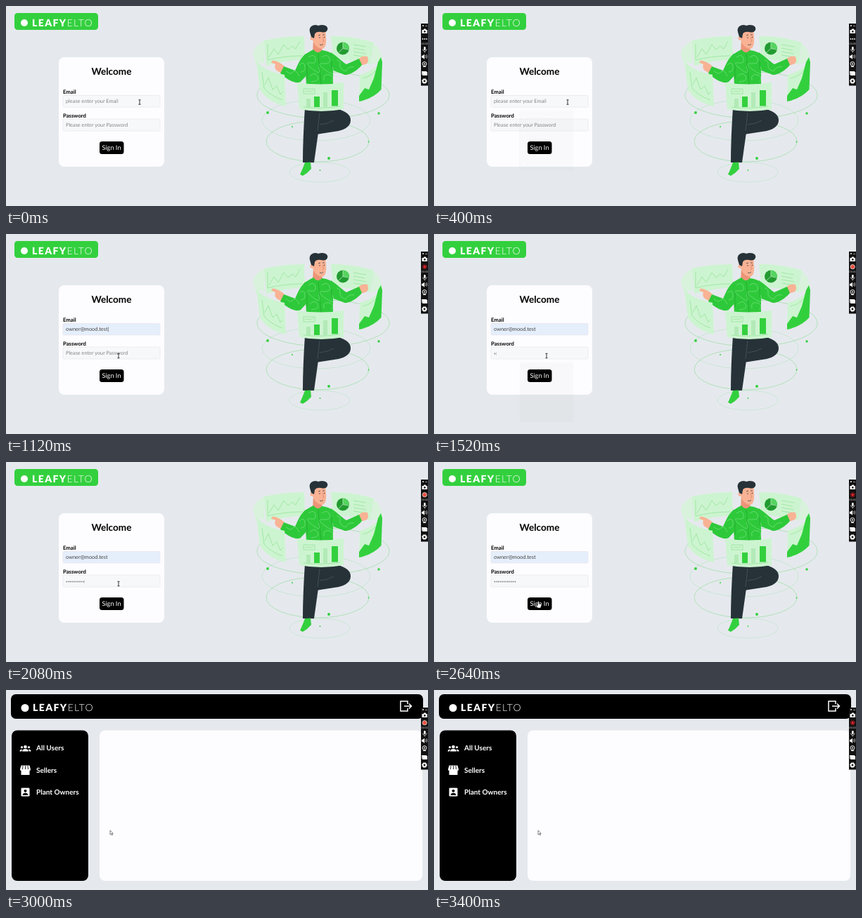
An HTML page for the animation above (3.44 s loop, 600 px wide and 285 px high).

```html
<!DOCTYPE html>
<html lang="en">
<head>
<meta charset="utf-8">
<title>Sign in demo</title>
<style>
html, body { margin: 0; width: 100%; height: 100%; overflow: hidden; background: #e5e9ed; }
svg { display: block; width: 600px; height: 285px; font-family: Lato, "Open Sans", sans-serif; text-rendering: geometricPrecision; }
.b { font-weight: 700; }
.logo { font-size: 14px; font-weight: 900; letter-spacing: 1.4px; fill: #fff; }
.logo .thin { font-weight: 300; letter-spacing: 1.2px; }
.line { fill: none; stroke: #45cf50; stroke-width: .5; stroke-opacity: .65; }
.panel { fill: #cdf4d0; }
.tiny { font-size: 5.3px; fill: #ddd; }
.ico { fill: none; stroke: #fff; stroke-width: 1.5; }
</style>
</head>
<body>
<svg viewBox="0 0 600 285">
<rect width="600" height="285" fill="#e5e9ed"/>

<g id="login">
  <rect x="12" y="10" width="119" height="24" rx="4.500" fill="#33d03e"/>
  <circle cx="26" cy="24" r="5" fill="#fff"/>
  <text class="logo" x="37" y="28.500">LEAFY<tspan class="thin">ELTO</tspan></text>

  <!-- rings and dots -->
  <g class="line">
    <ellipse cx="451" cy="127" rx="94" ry="33"/>
    <ellipse cx="441" cy="163" rx="77" ry="29" stroke-opacity=".35"/>
    <ellipse cx="443" cy="193" rx="73" ry="29"/>
    <ellipse cx="446" cy="237" rx="43" ry="14" stroke-opacity=".3"/>
  </g>
  <g fill="#33d03e">
    <circle cx="372" cy="152" r="1.900"/><circle cx="530" cy="153" r="1.700"/>
    <circle cx="407" cy="172" r="1"/><circle cx="515.500" cy="193.500" r=".9"/>
    <circle cx="459" cy="217" r="2"/><circle cx="446.500" cy="234" r=".9"/>
  </g>

  <!-- back panels -->
  <path d="M351 68Q354 55 368 49L367 82Q358 79 356 84ZM523 53Q533 60 535 77L519 84Z" fill="#d8f2dc"/>
  <path class="panel" d="M367 49Q395 43 424 43L425 76Q396 78 370 85ZM462 43Q494 43 523 52L518 83Q492 76 466 76Z"/>
  <path class="line" d="M372 54V77Q395 71 421 71M374 73l7-12 6 8 8-14 6 7 6-5 5 4 6-11M494 55l18 3M494 60l16 3M494 65l18 3M494 70l13 2"/>
  <circle cx="479" cy="60.500" r="9" fill="#229b30"/>
  <path d="M479 60.500V51.500A9 9 0 0 1 488 61.500Z" fill="#55d45f"/>
  <path d="M479 51V60.500L488 62.500M479 60.500L472 67" stroke="#cdf4d0" stroke-width=".7" fill="none"/>

  <!-- legs -->
  <g fill="#263238">
    <path d="M436 145H466C480 149 490 153 490 163C490 171 482 176 473 178L441 183Z"/>
    <path d="M425 145H448L444 180L438 223L422 223Q422 190 425 145Z"/>
  </g>
  <path d="M446 152L443 178M446 169Q458 168 466 163" fill="none" stroke="#55636a" stroke-width=".6"/>
  <path d="M425 223L433 222.500L434 232Q429 238 422 242L418 240Q421 234 425 223Z" fill="#33d03e"/>

  <!-- hands, neck, head -->
  <g fill="#f9b294">
    <path d="M396 86Q389 79 379 77.500L377 80.500L383 83Q381 88 385 92L392 96Z"/>
    <path d="M501 76Q506 70 514 72L515 77Q515 84 505 84Z"/>
    <path d="M437 49L436 66Q444 71 450 64L448 55Z" fill="#ec9478"/>
    <path d="M436 37L454 35Q458 60 449 61Q438 59 435 45Z"/>
    <circle cx="435" cy="46" r="2.600"/>
  </g>
  <path d="M432 37C430 30 437 25 444 28C452 25 459 29 457 34Q455 39 448 37Q441 36 439 40L438 46L434 44Z" fill="#263238"/>
  <path d="M444 42l3-1M450 41l3 0M446 55q3 2 5-1" fill="none" stroke="#263238" stroke-width=".7"/>
  <path d="M450 44l2 6-2 1" fill="none" stroke="#d4775f" stroke-width=".6"/>
  <circle cx="446" cy="45" r=".7" fill="#263238"/><circle cx="452.500" cy="44.500" r=".7" fill="#263238"/>

  <!-- shirt -->
  <g fill="#2ec93a">
    <path d="M426 68C417 76 415 84 411 92L395 86L390 96C399 105 413 112 419 108L430 96Z"/>
    <path d="M462 66C472 73 480 81 484 83L502 75L506 84C498 94 484 101 479 97L460 90Z"/>
    <path d="M425 69Q433 64 437 62Q444 70 449 63Q459 64 465 69L465 114H427Z"/>
  </g>
  <path d="M428 80V104M463 78V90M444 68L448 112" fill="none" stroke="#219c2e" stroke-width=".6"/>
  <path d="M398 92q6 7 10 2t9 6M417 84q7-6 8 2t-6 8M430 73q8-6 10 2t-8 6 4 9 8-4M432 100q7-7 11 0t-9 8M449 73q8-6 11 2t-9 7 4 10 9-5M452 106q-2-10 7-8t4 10M470 77q6 1 5 7t8 9q4-8 12-6" fill="none" stroke="#94ec9a" stroke-width=".5"/>

  <!-- front panels -->
  <path class="panel" d="M356 79Q368 93 396 98L398 143Q372 137 361 119ZM503 98Q526 92 534 76L533 119Q522 132 502 136Z"/>
  <path d="M364 94L367 117Q376 128 393 134M368 112l5-10 6 17 6-5 5 12 3-4M507 103Q519 100 526 92" class="line"/>
  <path d="M502 128L510 117L516 119L523 103L529 80L533 73L535 80L533.500 119Q522 132 502 136Z" fill="#33d03e"/>
  <path class="panel" d="M414 109Q447 114 480 109L480 147Q448 153 417 147Z"/>
  <path d="M423 118h16v7h-16zM425 122l4-1 4 1 4-2M423 144Q448 147 475 143" class="line"/>
  <path d="M427 132h6v12h-6zM451 123h6v21h-6z" fill="#b2eab7"/>
  <path d="M438 129h8v15h-8zM463 120h9v22.500h-9z" fill="#33d03e"/>

  <!-- form -->
  <rect x="75" y="73" width="150" height="156" rx="8" fill="#fdfcfe"/>
  <text class="b" x="150" y="98" font-size="13.600" text-anchor="middle">Welcome</text>
  <g class="b" font-size="7.700"><text x="81" y="125">Email</text><text x="81" y="158.500">Password</text></g>
  <g fill="#f7f8fa" stroke="#e5e7eb" stroke-width=".7">
    <rect id="mailBox" x="81" y="127.500" width="138" height="16.500" rx="1.500"/>
    <rect x="81" y="161" width="138" height="17" rx="1.500"/>
  </g>
  <text id="mail" x="85" y="138.200"></text>
  <text id="pass" x="85" y="171.700"></text>
  <rect x="133" y="193" width="34.500" height="18" rx="3.500"/>
  <text x="150" y="205.200" font-size="9.200" fill="#fff" text-anchor="middle">Sign In</text>

  <g id="menu">
    <rect x="121" y="149" width="77" height="85.500" rx="1" fill="#333"/>
    <g class="tiny">
      <text x="135" y="159">owner@mood...</text><text x="135" y="181">11@mood.test</text>
      <text x="136" y="228">Manage passwords...</text>
      <path d="M121 216H198" stroke="#888" stroke-width=".5"/>
      <circle cx="128" cy="160" r="2"/><circle cx="128" cy="182" r="2"/><circle cx="128" cy="204" r="2"/><circle cx="128" cy="226" r="2"/>
      <path d="M187 226h6m-2 0v2" stroke="#ddd"/>
    </g>
  </g>
  <g id="hints">
    <rect x="120" y="147" width="61" height="45.500" rx="2" fill="#202124" fill-opacity=".95"/>
    <g class="tiny"><text x="124" y="158">owner@mood.test</text><text x="124" y="172">ow@is.test</text><text x="124" y="186">owvelo@mood.test</text></g>
  </g>
  <rect id="menu2" x="122" y="183" width="76" height="85" rx="1" fill="#333"/>
</g>

<g id="dash">
  <rect x="7" y="6" width="586" height="35" rx="7"/>
  <circle cx="27" cy="25.500" r="5.500" fill="#fff"/>
  <text class="logo" x="38" y="30">LEAFY<tspan class="thin">ELTO</tspan></text>
  <rect x="8" y="57.500" width="109" height="214.500" rx="8"/>
  <rect x="133" y="57.500" width="459" height="214.500" rx="8" fill="#fdfcfe"/>
  <g class="b" font-size="10" fill="#fff"><text x="43" y="86.200">All Users</text><text x="43" y="117.700">Sellers</text><text x="43" y="149">Plant Owners</text></g>
  <g id="icons" fill="#fff">
    <path class="ico" d="M571 20V16H561V30H571V26M566 23H576M573 19.500L576.500 23L573 26.500"/>
    <circle cx="27.500" cy="81" r="2.300"/><circle cx="22.500" cy="81.500" r="1.600"/><circle cx="32.500" cy="81.500" r="1.600"/>
    <path d="M23 87.500Q23 84 27.500 84T32 87.500ZM19.500 87.500Q19.500 84.500 23 84.500L22 87.500ZM35.500 87.500Q35.500 84.500 32 84.500L33 87.500Z"/>
    <path d="M21.500 107.500H33.500L35 113Q35 115 33.500 115V121H21.500V115Q20 115 20 113Z"/>
    <path d="M24 108L23.500 113M27.500 108V113M31 108L31.500 113" stroke="#000" stroke-width=".8"/>
    <rect x="21.500" y="139.500" width="12" height="12" rx="1.300"/>
    <circle cx="27.500" cy="143.700" r="2" fill="#000"/><path d="M23.500 149.800Q24 146.800 27.500 146.800T31.500 149.800Z" fill="#000"/>
  </g>
  <g id="status"><rect y="278.500" width="199.500" height="6.500" fill="#43206f"/><text x="2" y="284" font-size="4.500" fill="#fff">Waiting for 54.171.157.106...</text></g>
</g>

<!-- recorder bar -->
<rect x="590" y="25" width="10" height="88.500" fill="#111"/>
<g fill="#fff">
  <path d="M592 27h2v2h-2zM596 28h3v.8h-3z" fill="#bbb"/>
  <path d="M591.500 34h2l1-1.500h2l1 1.500h1.500v5h-7.500z"/><circle cx="595.300" cy="36.400" r="1.300" fill="#111"/>
  <g id="dots"><circle cx="592.500" cy="47" r=".9"/><circle cx="595.300" cy="47" r=".9"/><circle cx="598" cy="47" r=".9"/></g>
  <circle id="ring" cx="595.200" cy="46.700" r="3.200" fill="#e8513f" stroke="#ddd" stroke-width=".8"/>
  <g id="star" fill="#f0252c"><circle cx="595.200" cy="46.700" r="1.700"/><circle cx="595.200" cy="46.700" r="2.700" fill="none" stroke="#f0252c" stroke-width="1.600" stroke-dasharray=".9 1.220"/></g>
  <text id="clock" x="595.200" y="54.500" font-size="3.600" text-anchor="middle" fill="#ccc"></text>
  <rect x="594" y="58" width="2.600" height="5" rx="1.300"/>
  <path d="M592.500 61.500q.3 3 2.800 3t2.800-3M595.300 64.500v2" fill="none" stroke="#fff" stroke-width=".7"/>
  <path d="M591 70.700h1.600l2.400-2v7l-2.400-2H591z"/><path d="M596.300 70q1.400 2 0 4M597.800 69q2 3 0 6" fill="none" stroke="#fff" stroke-width=".6"/>
  <circle cx="595" cy="82.500" r="2.900" fill="none" stroke="#fff"/><circle cx="595" cy="82.500" r="1"/><path d="M592.500 87h5l-1-1.300h-3z"/>
  <path d="M591 93h7v1h1v5h-7v-1h-1z"/><path d="M592 98.500v-4" stroke="#111" stroke-width=".5"/>
  <circle cx="595" cy="107" r="2.300" fill="none" stroke="#fff" stroke-width="1.700"/>
  <circle cx="595" cy="107" r="3.500" fill="none" stroke="#fff" stroke-width="1" stroke-dasharray="1.400 1.350"/>
</g>

<g id="cursor">
  <path id="beam" d="M-1.500-3.200H1.500M0-3.200V3.200M-1.500 3.200H1.500" fill="none" stroke="#222" stroke-width=".9"/>
  <path id="hand" d="M-1.500-4Q-.5-5 .3-4V-1L3-.4Q3.900 0 3.500 2L2.500 5H-1.500L-3.800 1.500Q-3.500.3-1.500 1.500Z" fill="#fff" stroke="#222" stroke-width=".6"/>
  <path id="arrow" d="M-1-3V3L.6 1.800 1.600 4 2.500 3.600 1.500 1.500H3.300Z" fill="#fff" stroke="#333" stroke-width=".6"/>
</g>
</svg>
<script>
const LOOP = 3440, LOGIN_END = 2660, ADDRESS = "owner@mood.test";
const path = [[0, 190, 137], [400, 190, 137], [560, 187, 142.5], [800, 187, 142.5], [900, 150, 157],
  [960, 150, 157], [1080, 160, 173.5], [2310, 160, 173.5], [2540, 149, 203], [LOOP, 149, 203]];
const $ = id => document.getElementById(id);
const show = (id, on) => $(id).setAttribute("visibility", on ? "inherit" : "hidden");
const ramp = (t, a, b) => Math.min(1, Math.max(0, (t - a) / (b - a)));

function field(id, text, hint, caret, size, color) {
  const el = $(id);
  el.textContent = (text || hint) + (caret ? "|" : "");
  el.setAttribute("fill", text ? color : "#858589");
  el.setAttribute("font-size", text ? size : 7.35);
}

function moveCursor(t) {
  const i = path.findIndex(p => p[0] > t), a = path[i - 1], b = path[i];
  const k = ramp(t, a[0], b[0]), e = k * k * (3 - 2 * k);
  $("cursor").setAttribute("transform", `translate(${a[1] + (b[1] - a[1]) * e} ${a[2] + (b[2] - a[2]) * e})`);
  show("beam", t < 2460);
  show("hand", t >= 2460 && t < LOGIN_END);
  show("arrow", t >= LOGIN_END);
}

function draw(t) {
  show("login", t < LOGIN_END);
  show("dash", t >= LOGIN_END);
  show("icons", t >= 2800);
  show("status", t >= LOGIN_END && t < 2960);

  const filled = t >= 960;
  const typed = filled ? ADDRESS : ADDRESS.slice(0, (t >= 640) + (t >= 720));
  field("mail", typed, "please enter your Email", typed && t < 1200, 7.4, "#444");
  $("mailBox").setAttribute("fill", filled ? "#e5eefb" : "#f7f8fa");
  const count = Math.min(11, Math.max(0, 1 + Math.floor((t - 1500) / 68)));
  field("pass", "•".repeat(count), "Please enter your Password", count && t < 2300, 5, "#777");

  $("menu").setAttribute("opacity", ramp(t, 400, 480) * (1 - ramp(t, 680, 830)));
  show("hints", t >= 720 && t < 960);
  $("menu2").setAttribute("opacity", .9 * ramp(t, 1220, 1290) * (1 - ramp(t, 1400, 1524)));

  const started = t >= 445, beat = (t - 445) / 740;
  const ring = started && beat % 1 < .5;
  show("dots", !started);
  show("ring", ring);
  show("star", started && !ring);
  $("clock").textContent = "00:0" + Math.max(0, Math.floor(beat));
  moveCursor(t);
}

const start = performance.now();
function frame() {
  draw((performance.now() - start) % LOOP);
  requestAnimationFrame(frame);
}
frame();
</script>
</body>
</html>
```
